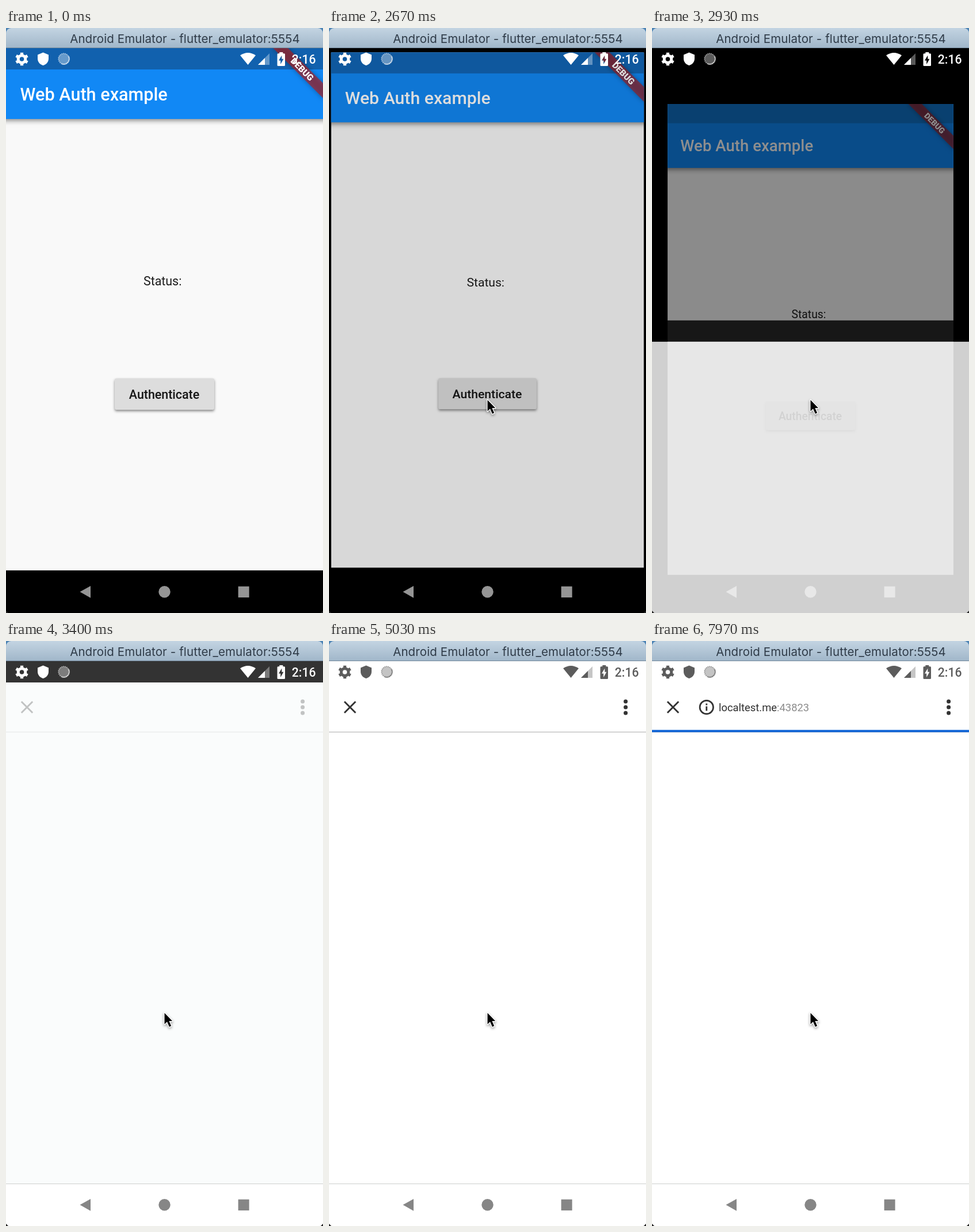
These frames come from a looping animation (551x1016 px, 8000 ms). An HTML page with a canvas:

```html
<!DOCTYPE html>
<html lang="en">
<head>
<meta charset="utf-8">
<title>Web Auth example</title>
<style>
  html, body { margin: 0; width: 100%; height: 100%; overflow: hidden; background: #000; }
  canvas { display: block; }
</style>
</head>
<body>
<canvas id="stage" width="551" height="1016"></canvas>
<script>
const W = 551, H = 1016, LOOP = 8000;
const TOP = 35, BAR = 72, TOOL = 158, NAV = 942;
const ctx = document.getElementById('stage').getContext('2d');

const ramp = (t, from, to) => Math.min(1, Math.max(0, (t - from) / (to - from)));
const lerp = (a, b, p) => a + (b - a) * p;
const easeOut = p => 1 - (1 - p) ** 2;
const easeInOut = p => p * p * (3 - 2 * p);
const grey = v => `rgb(${v},${v},${v})`;

function rect(x, y, w, h, color) {
  ctx.fillStyle = color;
  ctx.fillRect(x, y, w, h);
}

function disc(x, y, r, color) {
  ctx.fillStyle = color;
  ctx.beginPath();
  ctx.arc(x, y, r, 0, 7);
  ctx.fill();
}

function poly(color, ...points) {
  ctx.fillStyle = color;
  ctx.beginPath();
  for (let i = 0; i < points.length; i += 2) ctx.lineTo(points[i], points[i + 1]);
  ctx.closePath();
  ctx.fill();
}

function text(str, x, y, font, color, align = 'left') {
  ctx.font = font;
  ctx.fillStyle = color;
  ctx.textAlign = align;
  ctx.fillText(str, x, y);
}

function shadow(color, blur, dy) {
  ctx.shadowColor = color;
  ctx.shadowBlur = blur;
  ctx.shadowOffsetY = dy;
}

// Runs a drawing function with the canvas state kept intact around it.
function scoped(draw) {
  ctx.save();
  draw();
  ctx.restore();
}

function titleBar() {
  rect(0, 0, W, 12, '#4c83b4');
  const g = ctx.createLinearGradient(0, 0, 0, TOP);
  g.addColorStop(0, '#c3d4e2');
  g.addColorStop(1, '#a0b6c9');
  ctx.fillStyle = g;
  ctx.beginPath();
  ctx.roundRect(0, 0, W, TOP, [9, 9, 0, 0]);
  ctx.fill();
  rect(0, TOP - 1, W, 1, '#71879a');
  ctx.letterSpacing = '0.1px';
  text('Android Emulator - flutter_emulator:5554', 311, 25.5, '20.5px Inter, sans-serif', '#2f3b48', 'center');
  ctx.letterSpacing = '0px';
}

function statusIcons(color) {
  ctx.fillStyle = ctx.strokeStyle = color;

  // gear
  scoped(() => {
    ctx.translate(27.5, 54);
    ctx.lineWidth = 5;
    ctx.beginPath();
    ctx.arc(0, 0, 6.3, 0, 7);
    ctx.stroke();
    for (let i = 0; i < 6; i++) {
      ctx.rotate(Math.PI / 3);
      ctx.fillRect(-2.6, -11.3, 5.2, 5);
    }
  });

  // shield
  ctx.beginPath();
  ctx.moveTo(64.5, 42.5);
  ctx.lineTo(74, 46.5);
  ctx.lineTo(74, 53);
  ctx.bezierCurveTo(74, 59, 70, 63.5, 64.5, 65);
  ctx.bezierCurveTo(59, 63.5, 55, 59, 55, 53);
  ctx.lineTo(55, 46.5);
  ctx.fill();

  // spinner
  scoped(() => {
    ctx.globalAlpha *= 0.36;
    disc(100.5, 53.5, 9.5, color);
    ctx.globalAlpha *= 1.5;
    ctx.strokeStyle = color;
    ctx.lineWidth = 2;
    ctx.setLineDash([1.5, 1.5]);
    ctx.beginPath();
    ctx.arc(100.5, 53.5, 9.2, 0, 7);
    ctx.stroke();
    ctx.setLineDash([]);
    ctx.beginPath();
    ctx.arc(100.5, 53.5, 9.5, -0.5, 2);
    ctx.stroke();
  });

  // wifi
  ctx.fillStyle = color;
  ctx.beginPath();
  ctx.moveTo(420.5, 64);
  ctx.lineTo(407, 47.5);
  ctx.quadraticCurveTo(420.5, 38.5, 434, 47.5);
  ctx.fill();

  // signal
  scoped(() => {
    ctx.globalAlpha *= 0.35;
    poly(color, 438, 64, 458, 44, 458, 64);
  });
  poly(color, 438, 64, 450, 52, 450, 64);

  // battery with a bolt cut out
  ctx.beginPath();
  ctx.rect(475.3, 42, 6, 2.2);
  ctx.roundRect(471.5, 44.2, 13.5, 21.8, 1.5);
  ctx.moveTo(479.3, 47.5);
  ctx.lineTo(474, 56.5);
  ctx.lineTo(477.2, 56.5);
  ctx.lineTo(477.2, 63);
  ctx.lineTo(482.4, 53.8);
  ctx.lineTo(479.3, 53.8);
  ctx.fill('evenodd');

  text('2:16', 538.5, 62, '500 21.2px Roboto, sans-serif', color, 'right');
}

function navButtons(color) {
  poly(color, 128.5, 979.3, 147, 969, 147, 989.8);
  disc(275.5, 979.3, 10.2, color);
  rect(403.6, 969.8, 19, 19.2, color);
}

function debugBanner() {
  scoped(() => {
    ctx.translate(W, TOP);
    ctx.rotate(Math.PI / 4);
    scoped(() => {
      shadow('rgba(0,0,0,.5)', 9, 0);
      rect(-62, 42.9, 124, 18.4, 'rgba(183,28,28,.63)');
    });
    text('DEBUG', 0.5, 57, '900 15.3px Roboto, sans-serif', '#fff', 'center');
  });
}

function app(t) {
  const age = Math.max(0, t - 2560) / 370;
  const scale = 1 - 0.098 * age ** 1.67;
  const midY = (TOP + NAV) / 2;
  scoped(() => {
    ctx.translate(W / 2, midY + 52 * age ** 3);
    ctx.scale(scale, scale);
    ctx.translate(-W / 2, -midY);
    ctx.beginPath();
    ctx.rect(0, TOP, W, NAV - TOP);
    ctx.clip();

    rect(0, TOP, W, NAV - TOP, '#f9f9f9');
    scoped(() => {
      shadow('rgba(0,0,0,.45)', 8, 3);
      rect(-10, TOP, W + 20, TOOL - TOP, '#1188f5');
    });
    rect(0, TOP, W, BAR - TOP, `rgb(17,${97 + 18 * age},${174 + 26 * age})`);
    text('Web Auth example', 24.5, 126.3, '500 30.6px Roboto, sans-serif', '#fff');
    text('Status:', 239, 447, '21.4px Roboto, sans-serif', '#1c1c1c');

    scoped(() => {
      shadow('rgba(0,0,0,.45)', 4, 2.5);
      ctx.fillStyle = '#dddddd';
      ctx.beginPath();
      ctx.roundRect(189, 608.5, 173, 54.5, 3);
      ctx.fill();
      ctx.shadowColor = 'transparent';
      ctx.clip();
      const fade = ramp(t, 2150, 2200) * (1 - ramp(t, 2400, 2600));
      if (fade) disc(275.5, 644, 110 * easeOut(ramp(t, 2150, 2450)), `rgba(0,0,0,${0.14 * fade})`);
    });
    text('Authenticate', W / 2 - 0.5, 643.5, '500 21.4px Roboto, sans-serif', '#161616', 'center');
    debugBanner();
    rect(0, TOP, W, NAV - TOP, `rgba(0,0,0,${Math.min(0.6, 0.44 * age)})`);
  });
}

function toolbar(t) {
  scoped(() => {
    ctx.globalAlpha = ramp(t, 3300, 3660);
    ctx.strokeStyle = '#333';
    ctx.lineWidth = 2.9;
    ctx.beginPath();
    for (const s of [-1, 1]) {
      ctx.moveTo(36.5 - 9.7, 115 - 9.7 * s);
      ctx.lineTo(36.5 + 9.7, 115 + 9.7 * s);
    }
    ctx.stroke();
    for (const dy of [-10.1, 0, 10.1]) disc(515.6, 115 + dy, 3.5, '#333');
    rect(0, 157.5, W, 1.3, '#bbb');
  });

  const track = ramp(t, 6440, 6530);
  if (track) {
    rect(0, 154.5, W, 3.8, `rgba(193,216,247,${track})`);
    rect(0, 154.5, W * lerp(0.05 * track, 1, easeInOut(ramp(t, 7200, 7800))), 3.8, '#0d62d5');
  }

  const shown = easeOut(ramp(t, 7190, 7420));
  if (!shown) return;
  scoped(() => {
    ctx.globalAlpha = shown;
    ctx.strokeStyle = '#333';
    ctx.lineWidth = 2.7;
    ctx.beginPath();
    ctx.arc(94.8, 115, 11.7, 0, 7);
    ctx.stroke();
    rect(93.4, 113.5, 2.8, 7.7, '#333');
    rect(93.4, 108.6, 2.8, 2.8, '#333');
    const font = '18.4px Roboto, sans-serif';
    const x = lerp(82, 116, shown);
    text('localtest.me', x, 122, font, '#303030');
    text(':43823', x + ctx.measureText('localtest.me').width, 122, font, '#8c8c8c');
  });
}

function sheet(t) {
  const dy = (H - TOP) * (1 - easeInOut(ramp(t, 2675, 3175)));
  const arrive = ramp(t, 3200, 3350), settle = ramp(t, 3500, 3800);
  scoped(() => {
    ctx.globalAlpha = ramp(t, 2680, 2980);
    rect(0, TOP + dy, W, BAR - TOP, grey(lerp(51 * arrive, 255, settle)));
    const tint = lerp(250 + 2 * arrive, 255, settle);
    rect(0, BAR + dy, W, H, `rgb(${lerp(250, 255, settle)},${tint},${tint})`);
  });
  scoped(() => {
    ctx.globalAlpha = arrive;
    rect(0, NAV, W, H - NAV, '#fff');
    rect(0, NAV, W, 1.3, '#d6d8d7');
    navButtons('#868686');
  });
  toolbar(t);
}

function cursor(t) {
  const enter = easeOut(ramp(t, 600, 1400)), nudge = easeInOut(ramp(t, 1750, 1950));
  if (!enter) return;
  scoped(() => {
    ctx.translate(lerp(345, 277.5, enter) - 3 * nudge, lerp(1016, 645, enter) - nudge);
    ctx.lineJoin = 'round';
    ctx.lineWidth = 2.8;
    ctx.strokeStyle = '#fff';
    const arrow = new Path2D('M1 2V21.5L5.5 17.3 9.3 26 12.6 24.6 8.9 16H14.6Z');
    scoped(() => {
      shadow('rgba(0,0,0,.4)', 4, 2);
      ctx.stroke(arrow);
    });
    ctx.fillStyle = '#000';
    ctx.fill(arrow);
  });
}

function draw(t) {
  rect(0, 0, W, H, '#000');
  if (t < 3200) app(t);
  navButtons('#959595');
  if (t > 2670) sheet(t);
  statusIcons(grey(lerp(255, 92, ramp(t, 3500, 3800))));
  titleBar();
  poly('#222', 0, H - 4, 4, H, 0, H);
  poly('#222', W, H - 4, W - 4, H, W, H);
  cursor(t);
}

function tick() {
  draw(performance.now() % LOOP);
  requestAnimationFrame(tick);
}
tick();
</script>
</body>
</html>
```
